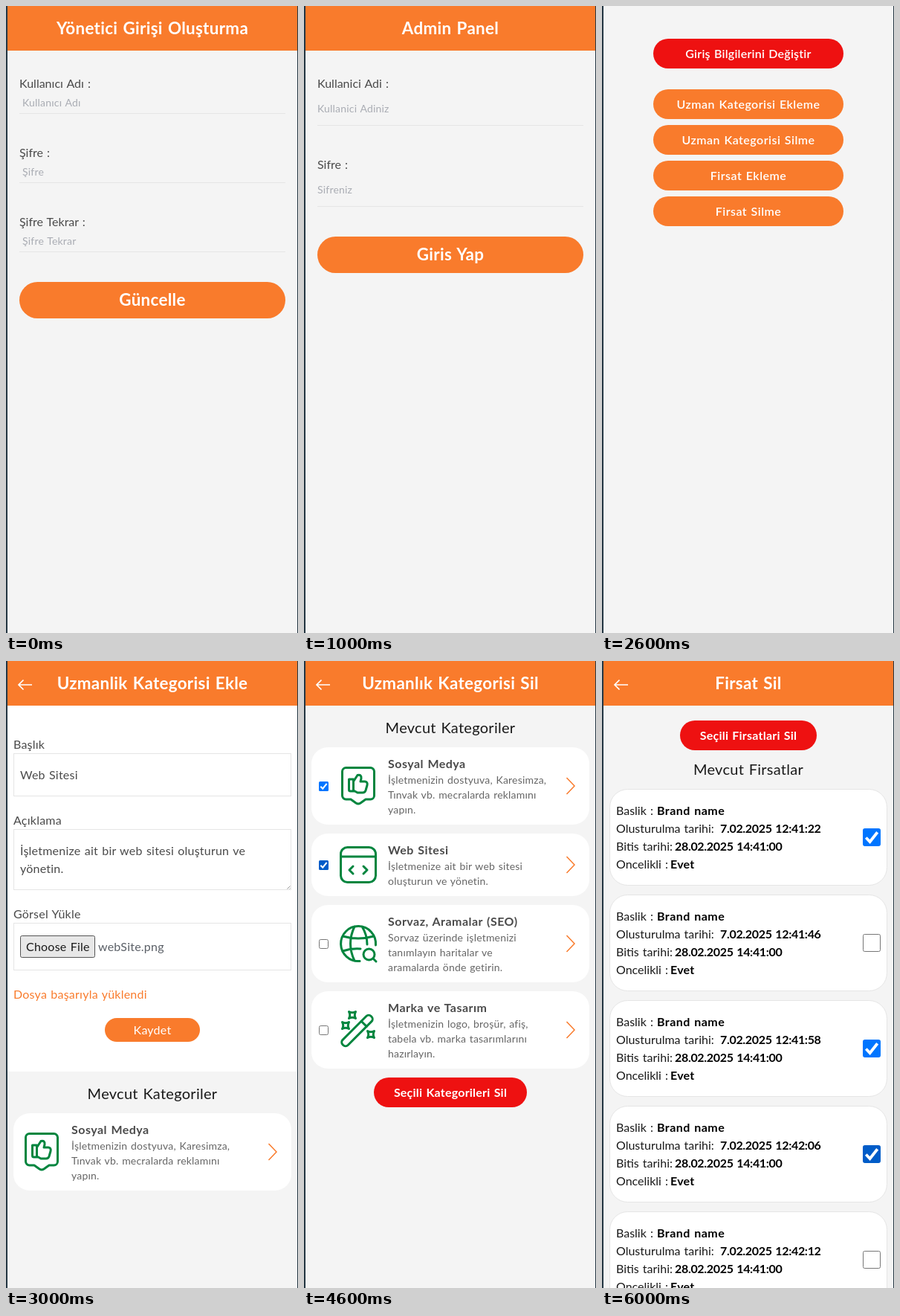
Write an HTML page that moves like this. It is 393 by 843 pixels and loops after 7 s.

```html
<!DOCTYPE html>
<html lang="tr">
<head>
<meta charset="utf-8">
<style>
html, body { margin: 0; width: 100%; height: 100%; overflow: hidden; background: #f4f4f4 }
svg { display: block; width: 393px; height: 843px }
text { font-family: Lato, "Open Sans", sans-serif; letter-spacing: .014em; word-spacing: .06em; white-space: pre }
.tight { letter-spacing: 0 }
.date { letter-spacing: -.02em }
.wide { letter-spacing: .03em }
</style>
</head>
<body>
<svg id="stage" viewBox="0 0 393 843"></svg>
<script>
const ORANGE = '#f97b2c', RED = '#ee1111', GRAY = '#4a4a4a', INPUT = '#5a5f66', BLACK = '#1a1a1a',
  LINE = '#e5e5e5', BLUE = '#0075ff', DARK_BLUE = '#005cc8';

// Text is placed by the middle of its line box.
const text = (x, y, str, { size = 16, color = GRAY, weight = 400, anchor = 'start', cls = '' } = {}) =>
  `<text class="${cls}" x="${x}" y="${y + Math.floor(size * .375)}" font-size="${size}" fill="${color}" font-weight="${weight}" text-anchor="${anchor}">${str}</text>`;
const centered = (y, str, opts) => text(197, y, str, { anchor: 'middle', ...opts });
const lines = (x, y, step, list, opts) => list.map((s, i) => text(x, y + i * step, s, opts)).join('');
const rect = (x, y, w, h, fill, r = 0, extra = '') =>
  `<rect x="${x}" y="${y}" width="${w}" height="${h}" rx="${r}" fill="${fill}" ${extra}/>`;
const outlined = (x, y, w, h, r = 0, stroke = LINE, fill = '#fff') =>
  rect(x + .5, y + .5, w - 1, h - 1, fill, r, `stroke="${stroke}"`);
const path = (d, stroke, width, extra = '') =>
  `<path d="${d}" fill="none" stroke="${stroke}" stroke-width="${width}" ${extra}/>`;

const pill = (x, y, w, h, color, str, opts) =>
  rect(x, y, w, h, color, h / 2) +
  text(x + w / 2, y + Math.floor(h / 2), str, { color: '#fff', weight: 600, anchor: 'middle', ...opts });
const header = (title, back) =>
  rect(2, 0, 390, 60, ORANGE) + centered(30, title, { size: 22.4, color: '#fff', weight: 700 }) +
  (back ? path('M35 32H17.5M23.5 25.5L17 32L23.5 38.5', '#fff', 1.7) : '');
const heading = (y, str) => centered(y, str, { size: 20, color: BLACK });
const check = (x, y, size, color) => color
  ? rect(x, y, size, size, color, size * .12) +
    path('M.18 .52L.4 .75L.82 .22', '#fff', .16, `transform="translate(${x} ${y}) scale(${size})"`)
  : outlined(x, y, size, size, 2, '#767676');
const grip = (x, y) => path(`M${x - 4} ${y}l4 -4M${x - 1} ${y}l1 -1`, '#777', .8);
const chooseFile = (x, y, name) =>
  outlined(x, y, 101, 30, 2, '#555', '#e7e7e7') +
  text(x + 8, y + 15, 'Choose File', { color: BLACK }) + text(x + 105, y + 15, name, { color: INPUT });
const loginField = (y, label, hint, x, hintY, lineY) =>
  text(18, y, label, { cls: 'tight' }) + text(x, y + hintY, hint, { size: 14, color: '#a9acb3' }) +
  rect(18, y + lineY, 358, 1, LINE);

const star = (x, y) =>
  `<path transform="translate(${x} ${y})" d="M-4.5-4.5Q0-2 4.5-4.5Q2 0 4.5 4.5Q0 2-4.5 4.5Q-2 0-4.5-4.5Z"/>`;
const icons = {
  social: `<path d="M-16.5-24.5H16.5a5 5 0 0 1 5 5V13a5 5 0 0 1-5 5H10L3 23q-3 2-6 0L-10 18H-16.5a5 5 0 0 1-5-5V-19.5a5 5 0 0 1 5-5Z"/>
    <path d="M-12.5-9H-6.5V7H-10.5q-2 0-2-2ZM-6.5-6L-1-14.5Q4.5-16 4-10L3-6H9Q13-5.5 12-1L10 6Q9 9 6 9H-1L-6.5 6"/>`,
  web: `<rect x="-23.5" y="-23.5" width="47" height="47" rx="9"/>
    <path d="M-23-11H23M-7 2L-12 7L-7 12M7 2L12 7L7 12"/>`,
  globe: `<path d="M23.5 2A23.5 23.5 0 1 0 2 23.5M-5-23Q-16 0-5 23M5-23Q12-12 12 1M-21-10Q0-4 21-10M-21 10Q-9 6 3 7"/>
    <circle cx="14.5" cy="14.5" r="7.5"/><path d="M20 20L24 24"/>`,
  wand: `<g transform="translate(-1.5 1) rotate(-45)"><rect x="-27" y="-5" width="54" height="10" rx="4.5"/><path d="M13-5V5"/></g>` +
    star(-8, -20) + star(-17, -6) + star(17, 6)
};
const icon = (name, x, y) =>
  `<g transform="translate(${x} ${y})" fill="none" stroke="#00853e" stroke-width="3" stroke-linecap="round" stroke-linejoin="round">${icons[name]}</g>`;

const categoryCard = (y, indent, name, title, desc) => {
  const h = 44 + desc.length * 20, mid = y + h / 2;
  return rect(10, y, 374, h, '#fff', 22) + icon(name, 48 + indent, mid) +
    text(88 + indent, y + 22, title, { weight: 700, cls: 'wide' }) +
    lines(88 + indent, y + 44, 20, desc, { size: 14, color: '#666' }) +
    path(`M353.5 ${mid - 11}L364 ${mid}L353.5 ${mid + 11}`, ORANGE, 1.5);
};
const social = ['social', 'Sosyal Medya', ['İşletmenizin dostyuva, Karesimza,', 'Tınvak vb. mecralarda reklamını', 'yapın.']];
const categories = [
  [116, BLUE, ...social],
  [232, DARK_BLUE, 'web', 'Web Sitesi', ['İşletmenize ait bir web sitesi', 'oluşturun ve yönetin.']],
  [328, '', 'globe', 'Sorvaz, Aramalar (SEO)', ['Sorvaz üzerinde işletmenizi', 'tanımlayın haritalar ve', 'aramalarda önde getirin.']],
  [444, '', 'wand', 'Marka ve Tasarım', ['İşletmenizin logo, broşür, afiş,', 'tabela vb. marka tasarımlarını', 'hazırlayın.']]
];
const deals = [['41:22', BLUE], ['41:46', ''], ['41:58', BLUE], ['42:06', DARK_BLUE], ['42:12', '']];
const dealCard = ([time, color], i) => {
  const y = 172 + i * 142;
  const row = (n, label, x, value, cls) =>
    text(19, y + 29 + n * 24, label, { color: BLACK, cls: 'tight' }) +
    text(x, y + 29 + n * 24, value, { color: '#000', weight: 700, cls });
  return outlined(10, y, 374, 130, 24) +
    row(0, 'Baslik :', 74, 'Brand name', 'wide') +
    row(1, 'Olusturulma tarihi:', 159, '7.02.2025 12:' + time, 'date') +
    row(2, 'Bitis tarihi:', 98, '28.02.2025 14:41:00', 'date') +
    row(3, 'Oncelikli :', 92, 'Evet', '') +
    check(351, y + 53, 24, color);
};
const formLabel = (y, str) => text(26, y, str, { size: 18, weight: 500 });
const big = { size: 22.4, weight: 700 };
const input = { color: INPUT };

const scenes = [
  header('Yönetici Girişi Oluşturma') +
    ['Kullanıcı Adı', 'Şifre', 'Şifre Tekrar'].map((s, i) => loginField(104 + i * 93, s + ' :', s, 22, 26, 40)).join('') +
    pill(18, 371, 358, 49, ORANGE, 'Güncelle', big),

  header('Admin Panel') +
    loginField(104, 'Kullanici Adi :', 'Kullanici Adiniz', 18, 34, 56) +
    loginField(213, 'Sifre :', 'Sifreniz', 18, 34, 56) +
    pill(18, 310, 358, 49, ORANGE, 'Giris Yap', big),

  pill(69, 44, 256, 40, RED, 'Giriş Bilgilerini Değiştir') +
    ['Uzman Kategorisi Ekleme', 'Uzman Kategorisi Silme', 'Firsat Ekleme', 'Firsat Silme']
      .map((s, i) => pill(69, 112 + i * 48, 256, 40, ORANGE, s, { cls: 'wide' })).join(''),

  rect(2, 60, 390, 492, '#fff') + header('Uzmanlik Kategorisi Ekle', true) +
    text(10, 112, 'Başlık') + outlined(10, 124, 374, 58) + text(19, 153, 'Web Sitesi') +
    text(10, 214, 'Açıklama') + outlined(10, 226, 374, 82) +
    lines(19, 255, 24, ['İşletmenize ait bir web sitesi oluşturun ve', 'yönetin.']) + grip(382.5, 306.5) +
    text(10, 340, 'Görsel Yükle') + outlined(10, 352, 374, 64) + chooseFile(19, 369, 'webSite.png') +
    text(10, 448, 'Dosya başarıyla yüklendi', { color: ORANGE }) +
    pill(133, 480, 128, 32, ORANGE, 'Kaydet', { weight: 400 }) +
    heading(582, 'Mevcut Kategoriler') + categoryCard(608, 0, ...social),

  header('Uzmanlık Kategorisi Sil', true) + heading(90, 'Mevcut Kategoriler') +
    categories.map(([y, color, ...card]) =>
      categoryCard(y, 25, ...card) + check(20, y + 16 + card[2].length * 10, 13, color)).join('') +
    pill(94, 560, 206, 40, RED, 'Seçili Kategorileri Sil', { weight: 700 }),

  rect(2, 50, 390, 688, '#fff', 7, 'style="filter:drop-shadow(0 2px 2px #0002)"') + header('Fırsat Ekle', true) +
    formLabel(98, 'Başlık') + outlined(26, 116, 342, 42, 5) + text(39, 137, 'Brand name', input) +
    formLabel(188, 'Açıklama') + outlined(26, 206, 342, 90, 5) +
    lines(39, 227, 24, ['Tüm alışverişlerde geçerli esnaflara özel', 'fırsatlar bu kampanyada'], input) + grip(366.5, 294.5) +
    formLabel(326, 'Görsel Yükle') + outlined(26, 344, 342, 32, 5) + chooseFile(27, 345, 'oncelikli.png') +
    formLabel(406, 'Bağlantı (Opsiyonel)') + outlined(26, 424, 342, 42, 5) +
    formLabel(496, 'Bitiş Tarihi') + outlined(26, 514, 342, 44, 5) + text(40, 536, '02/28/2025, 02:41 PM', input) +
    path('M339.7 531.5H350.3V542.3H339.7ZM339 532.5H351M342 529V531M348 529V531', '#000', 1.5) +
    check(26, 578, 16, BLUE) + text(50, 586, 'Öne Çıkan Fırsat', { color: RED }) +
    pill(26, 622, 342, 44, ORANGE, 'Fırsatı Ekle', { size: 20 }) +
    text(26, 702, 'Dosya başarıyla yüklendi', { color: BLACK }),

  header('Firsat Sil', true) + pill(105, 80, 184, 40, RED, 'Seçili Firsatlari Sil', { weight: 700 }) +
    heading(146, 'Mevcut Firsatlar') + deals.map(dealCard).join('')
];

const stage = document.getElementById('stage');
stage.innerHTML = rect(0, 0, 393, 843, '#f4f4f4') +
  scenes.map(s => `<g class="scene">${s}</g>`).join('') +
  rect(0, 0, 2, 843, '#263844') + rect(392, 0, 1, 843, '#263844');
const groups = [...stage.querySelectorAll('.scene')];

function draw() {
  const current = Math.floor(performance.now() / 1000) % groups.length;
  groups.forEach((g, i) => g.style.display = i === current ? '' : 'none');
  requestAnimationFrame(draw);
}
draw();
</script>
</body>
</html>
```
